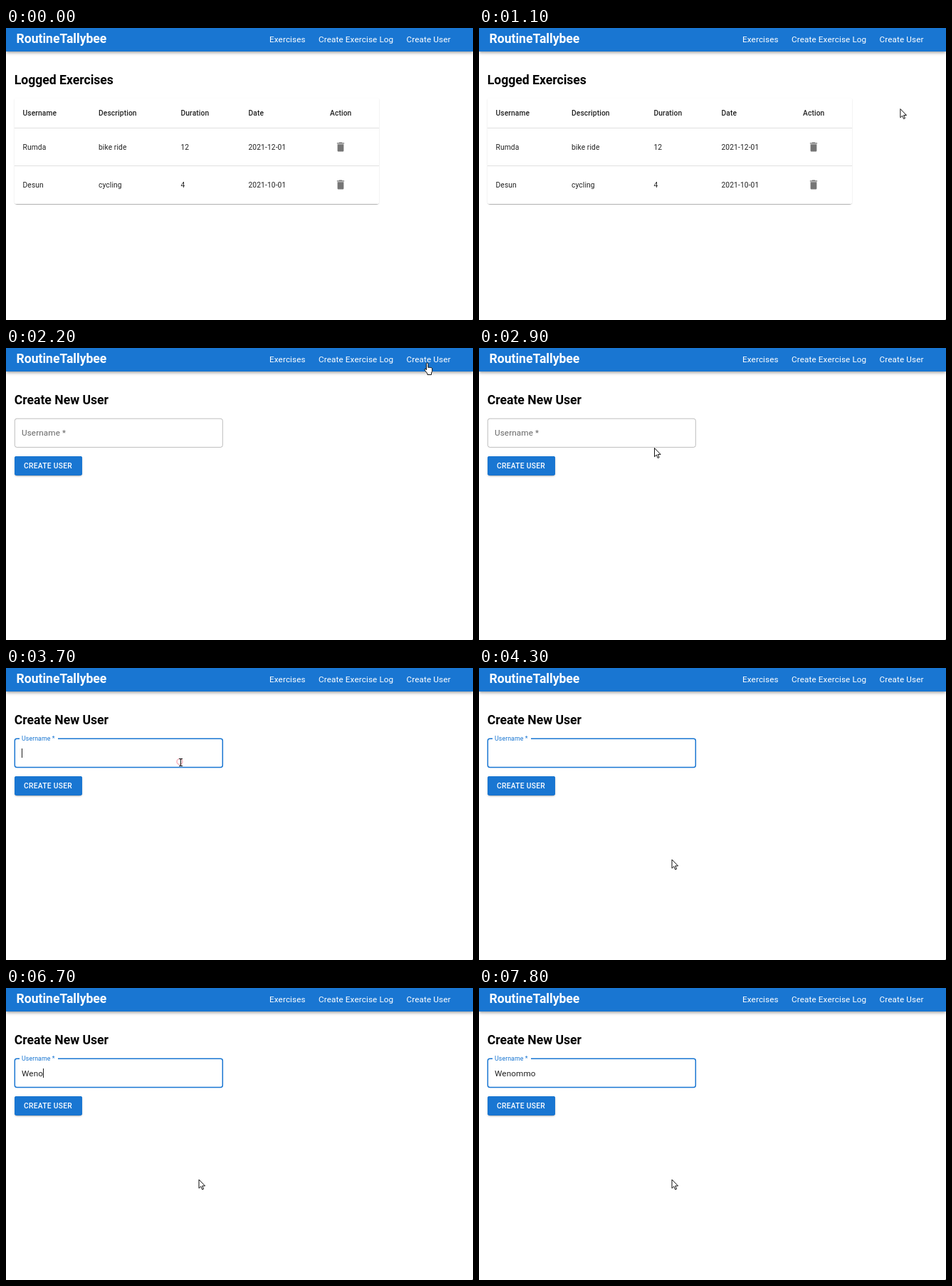
An HTML page with a canvas that plays this animation: 656x410 px, repeating every 8 s.

```html
<!DOCTYPE html>
<html lang="en">
<head>
<meta charset="utf-8">
<title>Exercise log</title>
<style>
html, body { margin: 0; width: 100%; height: 100%; overflow: hidden; background: #fff; }
canvas { display: block; width: 656px; height: 410px; }
</style>
</head>
<body>
<canvas id="stage" width="656" height="410"></canvas>
<script>
const ctx = document.getElementById('stage').getContext('2d');
const LOOP = 8000, STEP = 100;
const ZOOM = 0.7325; // page zoom: CSS pixels to stage pixels
const BLUE = '#1976d2', INK = 'rgba(0,0,0,.87)', MUTED = 'rgba(0,0,0,.6)';

const PAGE_SWITCH = 2100, FOCUS = 3500, FOCUSED = 3600, CARET_END = 7800;
const CLICKS = [2000, 3600];
const NAME = 'Wenommo';
const KEYS = [5100, 5800, 6200, 6700, 7100, 7300, 7700];

// Pointer stops: time, x, y
const PATH = [
  [1000, 592, 121], [1600, 590.5, 21], [2300, 590.5, 21],
  [2900, 246.5, 140.5], [3300, 245, 131.5], [3700, 245, 131.5], [4300, 271, 269]
];

const ARROW = new Path2D('M0 0V12.2L2.8 9.6 4.7 14 6.6 13.2 4.7 8.9H8.6Z');
const HAND = new Path2D('M3 1.2a1.2 1.2 0 0 1 2.4 0V6.5q.9-.8 2 0 .9-.6 1.9.2 1.5-.4 1.9 1V11.5L10 14V16.5H4.5V15L.8 10.2q-.9-1.6.4-1.9T3 9.8Z');
const BIN = new Path2D('M6 19c0 1.1.9 2 2 2h8c1.1 0 2-.9 2-2V7H6v12zM19 4h-3.5l-1-1h-5l-1 1H5v2h14V4z');

const NAV = [['Exercises', 370], ['Create Exercise Log', 439], ['Create User', 562.5]];
const COLUMNS = [23.5, 130, 245.5, 340.5, 455];
const HEAD = ['Username', 'Description', 'Duration', 'Date', 'Action'];
const ROWS = [
  ['Rumda', 'bike ride', '12', '2021-12-01'],
  ['Desun', 'cycling', '4', '2021-10-01']
];

const clamp = v => Math.max(0, Math.min(1, v));
const smooth = p => p * p * (3 - 2 * p);
const mix = (a, b, p) => a + (b - a) * p;

function setFont(size, weight, spacing) {
  ctx.font = `${weight} ${size * ZOOM}px Roboto, sans-serif`;
  ctx.letterSpacing = `${size * ZOOM * spacing}px`;
}

function text(str, x, y, size, color = INK, weight = 400, spacing = 0.00938) {
  setFont(size, weight, spacing);
  ctx.fillStyle = color;
  ctx.fillText(str, x, y);
}

function box(x, y, w, h, r) {
  ctx.beginPath();
  ctx.roundRect(x, y, w, h, r);
}

// Each layer: offset, blur, spread, opacity
function raised(x, y, w, h, r, color, layers) {
  for (const [dy, blur, spread, alpha] of layers) {
    const s = spread * ZOOM;
    ctx.save();
    ctx.shadowColor = `rgba(0,0,0,${alpha})`;
    ctx.shadowOffsetY = dy * ZOOM;
    ctx.shadowBlur = blur * ZOOM;
    ctx.fillStyle = color;
    box(x - s, y - s, w + 2 * s, h + 2 * s, r);
    ctx.fill();
    ctx.restore();
  }
  ctx.fillStyle = color;
  box(x, y, w, h, r);
  ctx.fill();
}

function drawBar() {
  raised(0, -10, 656, 43, 0, BLUE, [[2, 4, -1, .2], [4, 5, 0, .14], [1, 10, 0, .12]]);
  text('RoutineTallybee', 14.5, 21.4, 24, '#fff', 700, 0);
  for (const [label, x] of NAV) text(label, x, 19.9, 16, '#fff');
}

function drawTable() {
  text('Logged Exercises', 11.7, 79.2, 24, '#000', 700, 0);
  raised(12, 98.5, 512, 148.5, 3, '#fff', [[2, 1, -1, .2], [1, 1, 0, .14], [1, 3, 0, .12]]);
  HEAD.forEach((label, i) => text(label, COLUMNS[i], 123.1, 14, INK, 500, 0.01071));
  ROWS.forEach((row, r) => {
    const mid = 167 + 53 * r;
    ctx.fillStyle = '#e0e0e0';
    ctx.fillRect(12, mid - 27, 512, 1);
    row.forEach((cell, i) => text(cell, COLUMNS[i], mid + 3.8, 14, INK, 400, 0.01071));
    ctx.save();
    ctx.translate(470 - 12 * ZOOM, mid - 12 * ZOOM);
    ctx.scale(ZOOM, ZOOM);
    ctx.fillStyle = 'rgba(0,0,0,.54)';
    ctx.fill(BIN);
    ctx.restore();
  });
}

function drawField(t, hover) {
  const focused = t >= FOCUSED;
  const p = 1 - (1 - clamp((t - FOCUS) / 200)) ** 2;
  ctx.strokeStyle = focused ? BLUE : hover ? INK : 'rgba(0,0,0,.26)';
  ctx.lineWidth = focused ? 1.5 : 1;
  box(12.3, 99.2, 292, 40.2, 3);
  ctx.stroke();
  if (p > 0) {
    ctx.fillStyle = '#fff';
    ctx.fillRect(19, 97, 54 * p, 4);
  }
  text('Username *', 22, mix(123.2, 101.9, p), mix(16, 12, p), focused ? BLUE : MUTED);
  if (!focused) return;

  const pressed = KEYS.filter(k => k <= t);
  const typed = NAME.slice(0, pressed.length);
  text(typed, 22, 123.7, 16);
  const last = pressed.length ? pressed[pressed.length - 1] : FOCUSED;
  if ((t - last) % 1000 < 500 && t < CARET_END) {
    const x = Math.floor(22 + ctx.measureText(typed).width);
    ctx.fillRect(x, 113, 1, 13);
  }
}

function drawForm(t, hover) {
  text('Create New User', 11.7, 79.2, 24, '#000', 700, 0);
  drawField(t, hover);
  raised(12, 152, 95, 26.8, 3, BLUE, [[3, 1, -2, .2], [2, 2, 0, .14], [1, 5, 0, .12]]);
  text('CREATE USER', 25, 168.7, 14, '#fff', 500, 0.02857);
}

function pointerAt(t) {
  if (t < PATH[0][0]) return null;
  const next = PATH.findIndex(k => k[0] > t);
  if (next < 0) return PATH[PATH.length - 1].slice(1);
  const [t0, x0, y0] = PATH[next - 1], [t1, x1, y1] = PATH[next];
  const p = smooth((t - t0) / (t1 - t0));
  return [mix(x0, x1, p), mix(y0, y1, p)];
}

function drawShape(path, x, y) {
  ctx.save();
  ctx.translate(x, y);
  ctx.fillStyle = '#fff';
  ctx.strokeStyle = '#111';
  ctx.lineWidth = 1;
  ctx.lineJoin = 'round';
  ctx.fill(path);
  ctx.stroke(path);
  ctx.restore();
}

function drawBeam(x, y) {
  const cx = Math.round(x), top = Math.round(y - 5);
  ctx.fillStyle = '#111';
  ctx.fillRect(cx, top, 1, 11);
  for (const edge of [top, top + 10]) ctx.fillRect(cx - 2, edge, 5, 1);
}

function drawPointer(t, x, y, overField) {
  for (const start of CLICKS) {
    const age = t - start;
    if (age < 0 || age >= 200) continue;
    ctx.strokeStyle = 'rgba(240,90,110,.6)';
    ctx.lineWidth = 1.2;
    ctx.beginPath();
    ctx.arc(x - 1, y, mix(15, 4, age / 100), 0, 2 * Math.PI);
    ctx.stroke();
  }
  if (overField) drawBeam(x, y);
  else if (y < 30 && x > 562 && x < 625) drawShape(HAND, x - 3, y);
  else drawShape(ARROW, x, y);
}

function draw(t) {
  ctx.fillStyle = '#fff';
  ctx.fillRect(0, 0, 656, 410);
  const form = t >= PAGE_SWITCH;
  const pos = pointerAt(t);
  const overField = form && pos[0] > 12 && pos[0] < 304 && pos[1] > 99 && pos[1] < 139.5;
  if (form) drawForm(t, overField);
  else drawTable();
  drawBar();
  ctx.fillStyle = '#999';
  ctx.fillRect(655, 409, 1, 1);
  if (pos) drawPointer(t, pos[0], pos[1], overField);
}

function tick() {
  draw(Math.floor(performance.now() % LOOP / STEP) * STEP);
  requestAnimationFrame(tick);
}
tick();
</script>
</body>
</html>
```
